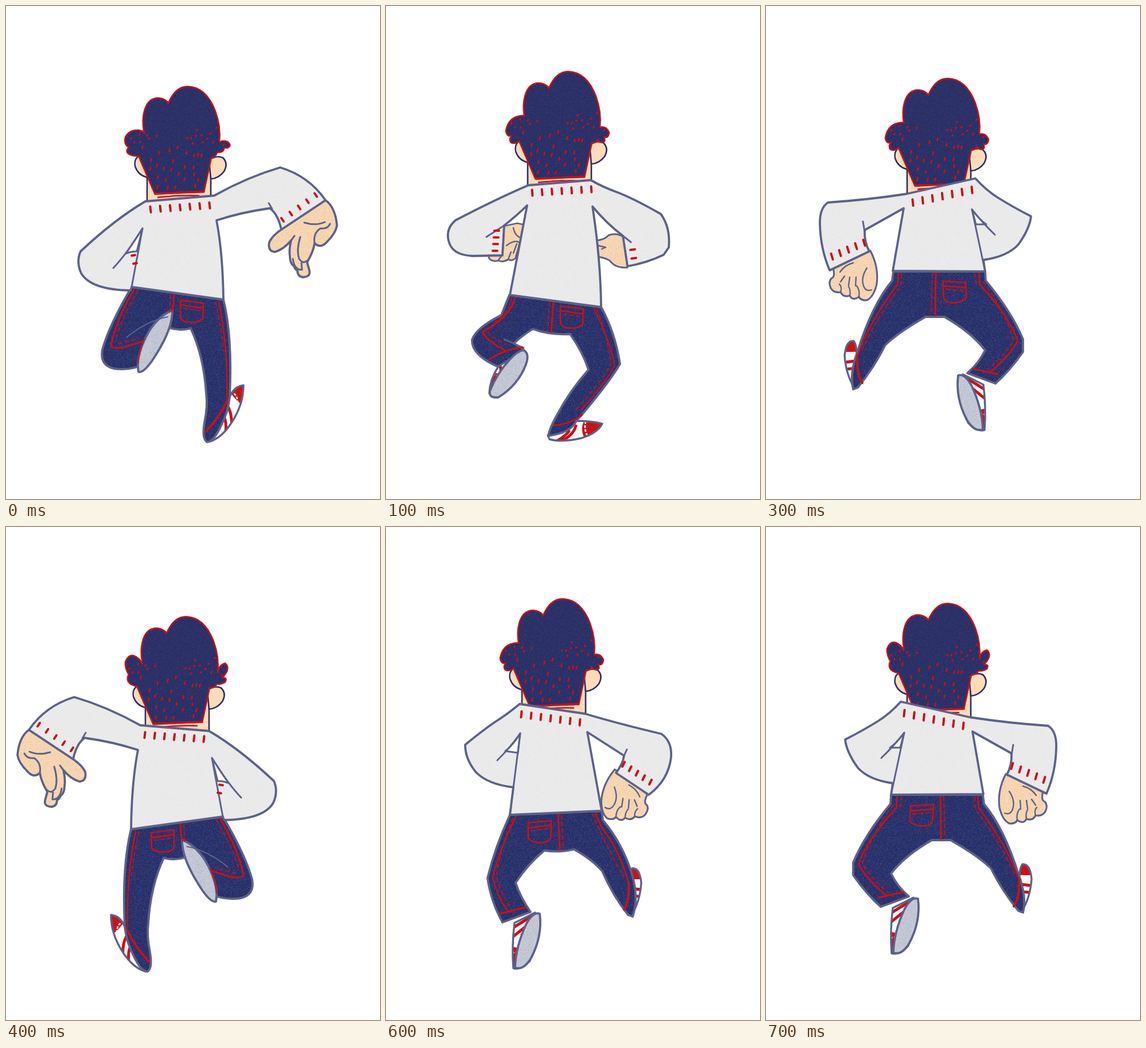
Write an HTML page with a canvas that moves like this. It is 652 px wide and 858 px high and loops after 0.8 s.

```html
<!DOCTYPE html>
<html lang="en">
<head>
<meta charset="utf-8">
<title>Runner</title>
<style>
html, body { margin: 0; width: 100%; height: 100%; overflow: hidden; background: #fff; }
canvas { display: block; }
</style>
</head>
<body>
<canvas id="stage" width="652" height="858"></canvas>
<script>
const ctx = document.getElementById('stage').getContext('2d');
const SLATE = '#5c6288', NAVY = '#282e66', RED = '#cc1016';

// fill colour and grain strength
const HAIR = ['#2a3067', 0.05], DENIM = ['#27306c', 0.11], KNIT = ['#ebebec', 0.02];
const SKIN = ['#fddcb9', 0.01], HAND = ['#f9d8b3', 0.07], SOLE = ['#c6cad8', 0.09];
const WHITE = ['#fdfdfd', 0];

function makeGrain(size) {
  const tile = document.createElement('canvas');
  tile.width = tile.height = size;
  const g = tile.getContext('2d');
  const img = g.createImageData(size, size);
  let seed = 7;
  const rnd = () => (seed = seed * 16807 % 2147483647) / 2147483647;
  for (let i = 0; i < img.data.length; i += 4) {
    const v = rnd() < 0.5 ? 0 : 255;
    img.data[i] = img.data[i + 1] = img.data[i + 2] = v;
    img.data[i + 3] = rnd() * 255;
  }
  g.putImageData(img, 0, 0);
  return ctx.createPattern(tile, 'repeat');
}
const grain = makeGrain(192);

function fill(d, [color, strength]) {
  const p = new Path2D(d);
  ctx.fillStyle = color;
  ctx.fill(p);
  if (!strength) return;
  ctx.globalAlpha = strength;
  ctx.fillStyle = grain;
  ctx.fill(p);
  ctx.globalAlpha = 1;
}

function line(d, color = SLATE, width = 3, dash = []) {
  ctx.strokeStyle = color;
  ctx.lineWidth = width;
  ctx.setLineDash(dash);
  ctx.stroke(new Path2D(d));
  ctx.setLineDash([]);
}

function shape(d, mat, color = SLATE, width = 3.8) {
  fill(d, mat);
  line(d, color, width);
}

const seam = (d, width = 3) => line(d, RED, width);
const stitch = d => line(d, RED, 2, [6, 6]);

function shoe(d, tip, stripes, dots) {
  fill(d, WHITE);
  ctx.save();
  ctx.clip(new Path2D(d));
  fill(tip, [RED, 0.04]);
  line(stripes, RED, 5);
  line(dots, '#fff', 3, [2, 5]);
  ctx.restore();
  line(d, SLATE, 3.4);
}

function pocket(x, y, angle) {
  ctx.save();
  ctx.translate(x, y);
  ctx.rotate(angle);
  seam('M0 0L40 5L39 32Q30 41 11 38Q1 36 0 28ZM0 8L40 14', 2.6);
  stitch('M5 14L37 19');
  ctx.restore();
}

// row of ribbing marks from (x0,y0) to (x1,y1), each leaning by (dx,dy)
function ribs(n, x0, y0, x1, y1, dx, dy) {
  for (let i = 0; i < n; i++) {
    const k = i / (n - 1);
    const x = x0 + (x1 - x0) * k, y = y0 + (y1 - y0) * k;
    line(`M${x - dx} ${y - dy}L${x + dx} ${y + dy}`, RED, 4);
  }
}

const crown = 'M240 217Q237 197 241 183Q247 160 266 160Q278 161 283 169Q295 140 317 140' +
  'Q349 141 365 183Q375 211 372 237';
// hair tufts: [right, left]
const tufts = [
  ['Q377 233 386 236Q395 243 386 247L380 247Q381 255 368 255Q366 263 358 264',
    'Q221 262 213 257Q208 252 214 246Q205 241 208 228Q215 215 231 216Q238 217 242 221'],
  ['Q383 234 388 246Q387 257 379 254Q384 265 372 263L368 259Q366 264 358 264',
    'Q222 268 216 263Q213 257 218 252Q209 254 208 243Q212 222 229 218Q236 216 241 217'],
  ['Q374 224 385 221Q392 226 388 236Q384 243 380 246Q390 246 385 254Q377 259 371 257Q367 264 358 264',
    'Q220 260 216 253Q213 246 217 241Q210 229 211 219Q216 205 226 208Q236 212 240 222']
];
const flecks = [
  333, 216, 367, 212, 316, 230, 323, 230, 331, 226, 341, 225, 356, 222, 299, 246, 285, 251,
  267, 256, 315, 256, 328, 260, 335, 259, 341, 260, 253, 268, 291, 270, 263, 278, 275, 283,
  312, 280, 327, 281, 288, 285, 252, 284, 301, 292, 328, 293, 265, 298, 279, 303, 311, 302,
  335, 303, 295, 316, 264, 316, 330, 313, 282, 316, 233, 223, 246, 225, 250, 231, 263, 226,
  234, 237, 238, 246, 224, 237, 218, 230, 361, 237, 343, 237, 351, 231, 325, 239, 379, 242
];

function head(x, y, kind) {
  ctx.setTransform(1, 0, 0, 1, x, y);
  fill('M246 260L246 347L357 347L357 260Z', SKIN);
  line('M246 290L246 344M357 290L357 344', NAVY, 2.6);
  fill('M238 259Q222 263 225 279Q230 295 246 298L260 270Z', SKIN);
  line('M230 262Q223 268 225 279Q230 294 245 298', NAVY, 2.4);
  shape('M354 268Q367 259 378 264Q388 274 380 288Q371 300 357 301Z', SKIN, NAVY, 2.6);
  const [right, left] = tufts[kind];
  shape(`${crown}${right}L345 324L259 326L231 261${left}Z`, HAIR, RED, 2.5);
  seam('M260 327L345 323', 3.4);
  seam('M265 333Q300 329 336 330', 2.6);
  for (let i = 0; i < flecks.length; i += 2) {
    const h = flecks[i + 1] > 242 ? 2.2 : 0.7;
    line(`M${flecks[i] + 0.5} ${flecks[i + 1] - h}l-1 ${h * 2}`, RED, 2.7);
  }
}

function landing() {
  shoe('M414 660Q392 663 387 692Q377 725 355 758Q376 752 394 724Q414 693 414 660Z',
    'M418 655L390 670Q398 684 410 693Z',
    'M386 696Q395 709 393 738M379 713Q386 725 382 748', 'M393 671Q404 677 404 692');
  shape('M219 489L379 511Q395 575 390 680Q387 708 375 730Q363 757 351 759Q341 754 346 725' +
    'Q352 695 349 675Q345 610 322 561Q304 566 284 560L290 530Q251 562 229 628Q210 634 188 631' +
    'Q163 625 168 598Q180 555 219 489Z', DENIM);
  shape('M290 529Q260 543 244 576Q226 612 231 637Q242 639 262 606Q291 560 290 529Z', SOLE);
  line('M210 577Q245 548 282 541', SLATE, 2);
  seam('M224 492Q193 543 183 591Q188 598 205 594L237 584');
  seam('M241 579Q231 603 230 622', 2);
  stitch('M230 496Q203 540 191 580M196 588L232 579M287 503L285 533');
  seam('M293 502Q293 520 289 531');
  seam('M371 514Q388 600 385 688', 2.4);
  seam('M385 688Q371 717 348 741', 4);
  stitch('M365 516Q374 550 379 600');
  pocket(304, 512, 0);
  shape('M480 389Q464 400 459 411Q456 427 469 428Q485 423 497 408Q493 424 495 436Q495 448 502 453' +
    'Q504 459 508 460Q508 471 518 472Q531 471 529 461L525 446Q536 427 538 413Q549 423 560 410' +
    'Q575 395 577 382Q574 350 557 338Z', HAND);
  line('M497 408L503 400M513 402Q506 425 511 440Q518 450 525 443M500 440Q503 460 516 459L515 447' +
    'M538 413Q535 396 548 387Q560 389 565 379M520 377Q540 383 556 376');
  shape('M243 340Q190 371 130 427Q122 445 131 465Q148 494 217 495L219 489L379 511Q378 430 367 373' +
    'Q410 359 460 352Q474 362 480 389L557 338Q528 296 478 281Q420 298 363 330Z', KNIT);
  shape('M238 387L228 427Q217 427 209 431Z', WHITE, SLATE, 3);
  line('M238 387L219 489M238 387Q210 432 187 456M464 353L458 343');
  ribs(7, 252, 354, 355, 347, 0.6, 5);
  ribs(5, 482, 372, 540, 329, 2, 3);
  ribs(2, 222, 434, 225, 448, 3, -0.5);
}

function crouch() {
  shoe('M282 747Q300 740 330 722Q358 722 377 727Q369 743 341 752Q306 760 285 754Z',
    'M385 722L346 722Q337 735 347 754L380 745Z',
    'M331 731Q326 748 304 758M319 740Q312 749 298 757', 'M348 724Q345 736 351 748');
  shape('M215 503L375 524Q399 567 408 623Q391 652 346 706L332 722Q322 743 283 748Q285 735 298 712' +
    'Q320 670 353 633Q343 602 321 571Q284 573 256 562Q237 574 223 587L241 599L196 628' +
    'Q149 608 150 581Q157 560 201 538Z', DENIM);
  line('M206 580L240 595', SLATE, 3);
  seam('M225 508Q216 542 168 567Q176 583 207 599M180 615Q208 597 238 594');
  stitch('M219 508Q214 535 186 552M178 567Q186 577 208 589M285 515L282 567');
  seam('M292 514L288 568');
  seam('M362 525Q391 585 399 625Q384 655 340 703', 2);
  stitch('M368 528Q388 580 392 624Q375 655 328 706');
  seam('M292 730Q325 727 342 711');
  pocket(304, 522, 0);
  shoe('M196 627Q181 650 180 674L203 662L240 600Z', 'M178 675L188 638L206 642L196 670Z',
    'M208 611L212 634M198 620L202 644', 'M187 641L202 645');
  shape('M239 599Q251 603 244 624Q230 660 196 681Q177 683 182 668Q193 640 216 615Q229 601 239 599Z', SOLE);
  shape('M206 383L229 378L242 381L226 438Q221 445 213 441Q204 447 196 443Q184 446 179 438L181 433L203 434Z',
    HAND, SLATE, 2.8);
  line('M222 386Q225 402 238 404M210 417Q226 404 236 414M228 414L222 430M213 441L218 428M196 442L202 434',
    SLATE, 2.4);
  shape('M364 408Q380 408 388 399Q402 394 414 402L421 455Q400 457 390 443Q380 437 364 436Z', HAND, SLATE, 3);
  line('M370 417L383 420L376 423', SLATE, 2.4);
  shape('M248 312Q190 337 121 373Q104 388 109 408Q114 433 150 435L203 434L206 382Q230 363 246 347' +
    'L216 503L375 524Q374 440 360 349Q385 379 413 400L421 453Q455 447 484 433L493 420' +
    'Q496 385 479 362Q430 334 400 323Q378 315 357 303Z', KNIT);
  line('M206 382L175 402M413 400L427 411');
  ribs(7, 255, 325, 358, 319, 0.4, 5);
  ribs(4, 193, 391, 190, 426, 4, 0);
  ribs(2, 430, 424, 432, 439, 4, -0.6);
}

function hangingHand() {
  shape('M116 456L182 426Q197 455 193 484Q188 506 176 512Q165 513 162 506Q151 514 146 504' +
    'Q135 508 130 498Q118 500 113 491Q108 480 114 474Q121 472 117 456Z', HAND, SLATE, 3.2);
  line('M152 447Q137 451 129 463M176 456Q165 472 170 487Q174 498 184 494M128 484Q133 490 130 498' +
    'M144 488Q148 495 146 504M162 506Q164 494 158 487M130 480L137 470M144 486L146 472M156 487L157 472', SLATE, 2.4);
}

function sideShoe() {
  shoe('M153 583Q140 581 137 608Q139 640 154 665Q160 640 158 604Q158 590 153 583Z',
    'M130 602L162 602L162 575L135 575Z', 'M130 621L162 617M130 633L162 630', 'M138 604L160 603');
}

function soleShoe() {
  shoe('M343 641L379 659Q384 700 381 738Q370 742 352 725Z', 'M364 705L388 699L386 742L370 742Z',
    'M350 648L384 669M354 661L384 685', 'M367 708L382 711');
  shape('M335 643Q346 639 358 660Q377 700 378 737Q363 742 350 720Q330 682 335 643Z', SOLE);
}

function leap() {
  sideShoe();
  shape('M222 462L382 462L383 478Q428 532 448 580L448 602Q425 635 400 657L351 639Q371 622 382 599' +
    'Q357 567 311 541L278 541Q229 569 208 590Q188 630 160 664L152 667Q145 640 160 600Q185 520 220 478Z', DENIM);
  seam('M231 465L229 485Q180 550 160 607', 2.6);
  stitch('M236 467L235 487Q190 548 166 602M290 466L288 538');
  seam('M159 608Q157 640 168 656', 4);
  seam('M296 464L295 539');
  seam('M371 464L373 485Q424 540 439 583Q421 614 389 638', 2.6);
  stitch('M379 480Q418 534 432 582Q412 612 386 632M364 466L367 486');
  seam('M360 631L404 641');
  pocket(308, 479, -0.07);
  soleShoe();
  hangingHand();
  shape('M245 327Q180 337 108 342Q93 352 94 380Q95 423 111 460L180 427Q171 410 172 390L240 352L221 461' +
    'L382 462L379 442Q421 436 440 415Q460 387 462 366Q429 349 405 334Q384 321 365 300Z', KNIT);
  shape('M359 354Q371 371 384 380L366 380Z', WHITE, SLATE, 3);
  line('M359 354L382 462M359 354Q378 378 399 398M172 393L169 375');
  ribs(7, 256, 342, 359, 320, 0.6, 5.5);
  ribs(5, 115, 436, 171, 412, -1.5, -5);
}

function pushOff() {
  ctx.save();
  ctx.translate(12, 4);
  sideShoe();
  ctx.restore();
  shape('M218 487L378 494Q404 550 417 604Q411 645 391 681L342 663Q361 635 368 612Q347 580 318 556' +
    'Q290 560 266 554Q234 572 217 592Q199 634 172 668L164 671Q153 640 165 598Q181 545 216 503Z', DENIM);
  seam('M228 490Q225 508 205 534Q183 568 172 610', 2.6);
  seam('M171 612Q169 642 179 659', 4);
  stitch('M234 492Q222 525 180 602M288 494L285 554');
  seam('M294 493L291 555');
  seam('M367 496Q397 555 408 604Q400 637 381 662', 2.6);
  stitch('M373 500Q396 555 401 604Q392 634 374 660');
  seam('M350 655L396 666');
  pocket(306, 504, -0.03);
  ctx.save();
  ctx.translate(-9, 23);
  soleShoe();
  ctx.restore();
  ctx.save();
  ctx.translate(166, 440);
  ctx.rotate(-0.22);
  ctx.translate(-148, -444);
  hangingHand();
  ctx.restore();
  shape('M247 318Q190 335 114 353Q95 366 97 394Q102 434 136 459L193 421Q181 405 179 391L243 350L218 487' +
    'L378 494L372 446Q416 441 437 420Q456 397 456 372Q428 349 405 333Q384 320 361 301Z', KNIT);
  shape('M360 352Q371 371 386 383L364 386Z', WHITE, SLATE, 3);
  line('M360 352L378 494M360 352Q380 380 400 399M179 391L174 380');
  ribs(7, 256, 333, 358, 319, 0.5, 5.2);
  ribs(5, 133, 437, 180, 406, -2, -4);
}

// second stride mirrors the first: [pose, mirror axis sum, drop]
const strides = [[landing, 597, 15], [crouch, 588, 9], [pushOff, 594, 7], [leap, 600, 4]];
// head offset and tuft kind per pose
const heads = [[0, 0, 0], [1, -26, 1], [0, -24, 1], [0, -14, 1],
  [-3, 16, 2], [-18, -16, 1], [-9, -15, 1], [0, -7, 2]];

function draw(step) {
  ctx.setTransform(1, 0, 0, 1, 0, 0);
  ctx.fillStyle = '#fff';
  ctx.fillRect(0, 0, 652, 858);
  head(...heads[step]);
  const [body, sum, drop] = strides[step % 4];
  if (step < 4) ctx.setTransform(1, 0, 0, 1, 0, 0);
  else ctx.setTransform(-1, 0, 0, 1, sum, drop);
  body();
}

ctx.lineCap = ctx.lineJoin = 'round';
let shown = -1;
function tick() {
  const step = Math.floor(performance.now() / 100) % 8;
  if (step !== shown) draw(shown = step);
  requestAnimationFrame(tick);
}
tick();
</script>
</body>
</html>
```
